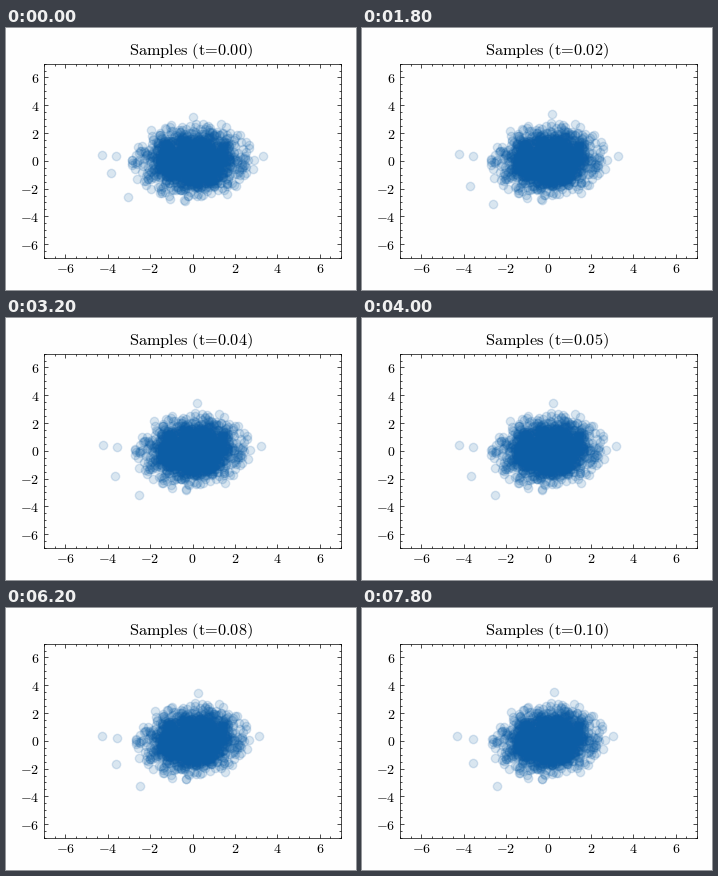
A matplotlib script that plays this animation: 350 by 262 pixels, repeating every 8000 ms.

```python
import numpy as np
import matplotlib.pyplot as plt
from matplotlib.animation import FuncAnimation
from matplotlib.ticker import MultipleLocator

W, H, DPI = 350, 262, 100
FRAMES, INTERVAL = 40, 200
COUNT, MAX_RADIUS = 2000, 2.95
BLUE = "#0C5DA5"

plt.rcParams.update({
    "mathtext.fontset": "cm",
    "axes.linewidth": 0.5,
    "lines.linewidth": 1.0,
})

# Far outliers: start, quick first shift, slow drift
OUTLIERS = np.array([
    [(-4.27, 0.43), (0.10, 0.10), (-0.13, -0.21)],
    [(-3.61, 0.36), (0.07, 0.05), (0.00, -0.30)],
    [(-3.84, -0.87), (0.09, -1.19), (0.21, 0.47)],
    [(-3.04, -2.60), (0.45, -0.58), (0.14, -0.07)],
    [(3.32, 0.36), (0.00, 0.00), (-0.26, 0.00)],
    [(0.00, 3.14), (0.17, 0.22), (0.09, 0.14)],
])

rng = np.random.default_rng(11)
cloud = rng.normal(0, 1.02, (COUNT, 2))
cloud = cloud[np.hypot(*cloud.T) < MAX_RADIUS]


def phases(i):
    """Quick settling phase and steady phase, both from 0 to 1."""
    return 1 - np.exp(-i / 4), i / (FRAMES - 1)


def points(i):
    quick, slow = phases(i)
    g = 0.6 * quick + 0.4 * slow
    x, y = cloud.T
    bulk = np.column_stack([
        x * (1 - 0.08 * g) + 0.08 * g * np.sin(1.3 * y),
        y * (1 - 0.03 * g) + g * (0.04 + 0.08 * np.sin(1.4 * x + 0.5)),
    ])
    start, shift, drift = OUTLIERS.transpose(1, 0, 2)
    return np.vstack([bulk, start + shift * quick + drift * slow])


def title_text(i):
    t = i / 399
    eq = r"\hspace{-0.2}=\hspace{-0.2}"
    return rf"$\mathrm{{Samples}}\ \mathrm{{(t}}{eq}\mathrm{{{t:.2f})}}$"


fig = plt.figure(figsize=(W / DPI, H / DPI), dpi=DPI, facecolor="#fefefe")
ax = fig.add_axes([38 / W, 32 / H, 297 / W, 194.4 / H], facecolor="#fefefe")
ax.set(xlim=(-7, 7), ylim=(-7, 7))

ticks = np.arange(-6, 7, 2)
labels = [f"${v}$" for v in ticks]
ax.set_xticks(ticks, labels)
ax.set_yticks(ticks, labels)
for axis in (ax.xaxis, ax.yaxis):
    axis.set_minor_locator(MultipleLocator(0.5))
ax.tick_params(which="both", direction="in", top=True, right=True, width=0.5)
ax.tick_params(which="major", length=3, labelsize=10)
ax.tick_params(axis="x", which="major", pad=3)
ax.tick_params(which="minor", length=1.5)

dots = ax.scatter(*points(0).T, s=36, color=BLUE, alpha=0.15, linewidths=1.0)
title = ax.set_title(title_text(0), fontsize=11.75, pad=6, x=0.495)


def update(i):
    dots.set_offsets(points(i))
    title.set_text(title_text(i))
    return dots, title


anim = FuncAnimation(fig, update, frames=FRAMES, interval=INTERVAL,
                     init_func=lambda: update(0), repeat=True,
                     repeat_delay=0, blit=False)
plt.show()
```
